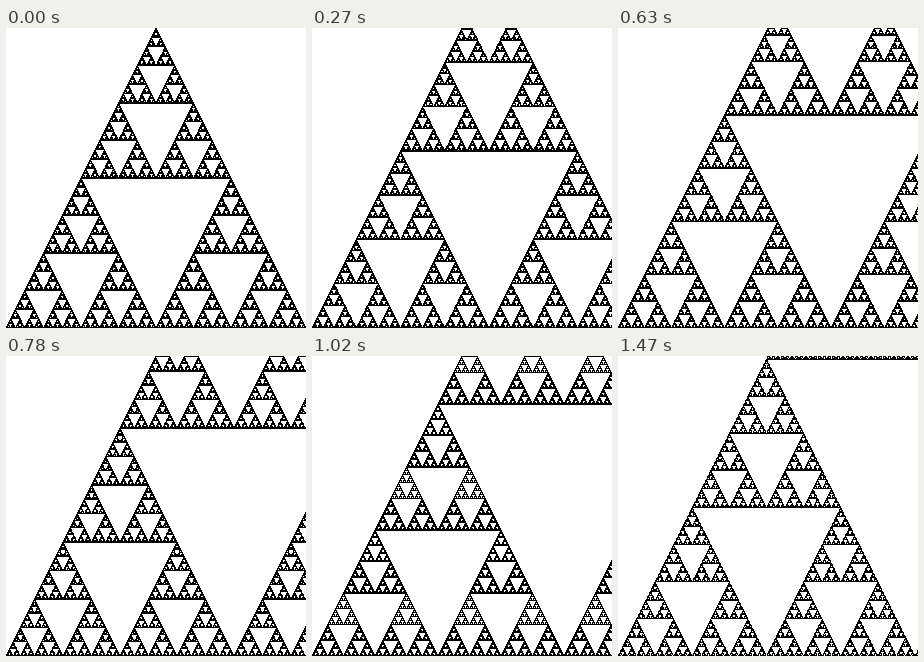
An HTML page with a canvas for the animation above (1.5 s loop, 300 by 300 pixels).

```html
<!DOCTYPE html>
<html lang="en">
<head>
<meta charset="utf-8">
<title>Sierpinski zoom</title>
<style>
  html, body { margin: 0; width: 100%; height: 100%; overflow: hidden; background: #fff; }
  canvas { display: block; width: 300px; height: 300px; image-rendering: pixelated; }
</style>
</head>
<body>
<canvas id="stage" width="300" height="300"></canvas>
<script>
  const SIZE = 300, LOOP = 1500, STEP = 30, DEPTH = 10;
  const ctx = document.getElementById('stage').getContext('2d');

  // (x, y) is the bottom-left corner; height equals width.
  function sierpinski(x, y, size, depth) {
    if (x >= SIZE || y < 0) return;
    if (depth === 0) {
      ctx.fillRect(Math.floor(x + size / 2), Math.floor(y + 1e-6), 1, 1);
      return;
    }
    const half = size / 2;
    sierpinski(x, y, half, depth - 1);
    sierpinski(x + half, y, half, depth - 1);
    sierpinski(x + half / 2, y - half, half, depth - 1);
  }

  function draw(step) {
    const zoom = 1 + step * STEP / LOOP;
    ctx.fillStyle = '#fff';
    ctx.fillRect(0, 0, SIZE, SIZE);
    ctx.fillStyle = '#000';
    sierpinski(0, SIZE, SIZE * zoom, DEPTH);
  }

  let start = null, last = -1;
  function tick() {
    const now = performance.now();
    if (start === null) start = now;
    const step = Math.floor(((now - start) % LOOP) / STEP);
    if (step !== last) draw(last = step);
    requestAnimationFrame(tick);
  }
  tick();
</script>
</body>
</html>
```
